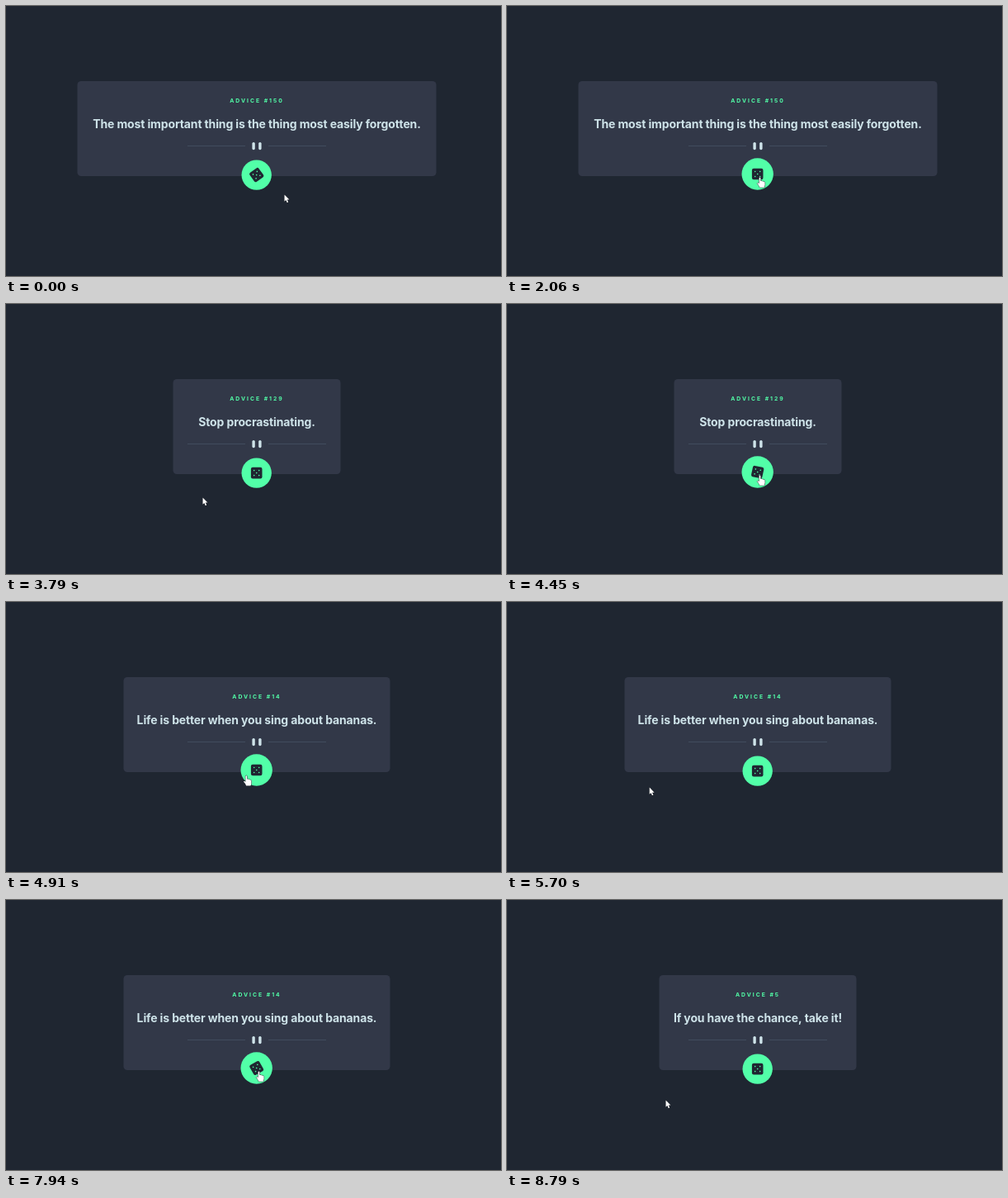
An HTML page with a canvas that plays this animation: 600 px wide and 327 px high, repeating every 9 s.

```html
<!DOCTYPE html>
<html lang="en">
<head>
<meta charset="utf-8">
<title>Advice generator</title>
<style>
  html, body { margin: 0; width: 100%; height: 100%; overflow: hidden; background: #1f2631; }
  canvas { display: block; width: 600px; height: 327px; }
</style>
</head>
<body>
<canvas id="stage"></canvas>
<script>
const LOOP = 9000, W = 600, H = 327, CX = 304;
const SPIN = 600, FETCH = 360, FADE = 150;
const BG = '#1f2631', CARD = '#323848', TEXT = '#cee3e9', GREEN = '#52ffa8', RULE = '#465365';
const FONT = 'Inter, "Open Sans", sans-serif';
const BUTTON = { x: 303.7, y: 204.6, r: 18.2 };

const canvas = document.getElementById('stage');
const ctx = canvas.getContext('2d');
const dpr = window.devicePixelRatio || 1;
canvas.width = W * dpr;
canvas.height = H * dpr;

const advice = [
  { click: -FETCH, id: 150, width: 435, quote: 'The most important thing is the thing most easily forgotten.' },
  { click: 2060, id: 129, width: 203, quote: 'Stop procrastinating.' },
  { click: 4240, id: 14, width: 323, quote: 'Life is better when you sing about bananas.' },
  { click: 7785, id: 5, width: 239, quote: 'If you have the chance, take it!' }
];

// the pointer rests at each place until the next move starts
const home = { x: 337.5, y: 228.5 };
const press = { x: 306.5, y: 207.5 };
const moves = [
  { from: 1390, to: 1910, ...press },
  { from: 2540, to: 3270, x: 215.5, y: 240.5 },
  { from: 3450, to: 3780, x: 238.5, y: 234.5 },
  { from: 3880, to: 4150, ...press },
  { from: 4760, to: 5390, x: 201.5, y: 226 },
  { from: 5640, to: 5910, x: -20, y: 215 },
  { from: 6700, to: 6880, x: 249, y: 174 },
  { from: 6940, to: 7350, ...press },
  { from: 8220, to: 8790, x: 192.5, y: 242.5 }
];

function ease(u) {
  u = Math.min(1, Math.max(0, u));
  return u * u * (3 - 2 * u);
}

function pointer(t) {
  return moves.reduce((p, m) => {
    const u = ease((t - m.from) / (m.to - m.from));
    return { x: p.x + (m.x - p.x) * u, y: p.y + (m.y - p.y) * u };
  }, home);
}

function isOver(t) {
  const p = pointer(t);
  return Math.hypot(p.x - BUTTON.x, p.y - BUTTON.y) < BUTTON.r + 1;
}

// eased share of the recent past spent over the button
function hoverLevel(t) {
  const steps = 15;
  let n = 0;
  for (let k = 0; k < steps; k++) n += isOver(t - k * FADE / steps);
  return ease(n / steps);
}

function spinAngle(t) {
  const { click } = advice.findLast(a => a.click <= t);
  return Math.PI * 2 * ease((t - click) / SPIN);
}

function box(x, y, w, h, r, color) {
  ctx.fillStyle = color;
  ctx.beginPath();
  ctx.roundRect(x, y, w, h, r);
  ctx.fill();
}

function dot(x, y, r, color) {
  ctx.fillStyle = color;
  ctx.beginPath();
  ctx.arc(x, y, r, 0, Math.PI * 2);
  ctx.fill();
}

function label(text, y, size, spacing, color) {
  ctx.font = `700 ${size}px ${FONT}`;
  ctx.letterSpacing = spacing + 'px';
  ctx.textAlign = 'center';
  ctx.fillStyle = color;
  ctx.fillText(text, CX, y);
}

function drawCard(t) {
  const { id, width, quote } = advice.findLast(a => a.click + FETCH <= t);
  box(CX - width / 2, 91, width, 115, 4.5, CARD);
  label('ADVICE #' + id, 116.7, 6.8, 2, GREEN);
  label(quote, 147.8, 14, -0.13, TEXT);
  for (const side of [-1, 1]) {
    box(CX + side * 49 - 35, 169.2, 70, 0.8, 0, RULE);
    box(CX + side * 3.9 - 1.7, 165, 3.4, 9.2, 1.6, TEXT);
  }
}

function drawButton(t) {
  const level = hoverLevel(t);
  ctx.save();
  ctx.translate(BUTTON.x, BUTTON.y - 1.1 * level);
  dot(0, 0, BUTTON.r * (1 + 0.055 * level), GREEN);
  ctx.rotate(spinAngle(t));
  box(-6.8, -6.8, 13.6, 13.6, 2.2, BG);
  dot(0, 0, 0.8, GREEN);
  for (const x of [-3, 3]) for (const y of [-3, 3]) dot(x, y, 0.8, GREEN);
  ctx.restore();
}

function outline(shape) {
  ctx.lineJoin = 'round';
  ctx.lineWidth = 1;
  ctx.strokeStyle = '#14181f';
  ctx.stroke(shape);
  ctx.fillStyle = '#fff';
  ctx.fill(shape);
}

const arrow = new Path2D('M0 0V9.2L2.1 7.3L3.6 10.8L5.2 10.1L3.7 6.8H6.6Z');
const hand = new Path2D('M-1 1C-1 -.3 1 -.3 1 1V5Q2.8 4 3 5.4Q4.8 4.8 5 6' +
  'Q6.8 5.7 6.8 7V10Q6.8 11.5 5.8 13.6H-.2Q-.8 11 -3.4 8.7C-4 7.6 -2.6 6.8 -1 8.4Z');

function drawPointer(t) {
  const { x, y } = pointer(t);
  ctx.save();
  ctx.translate(x, y);
  ctx.scale(0.9, 0.9);
  outline(isOver(t) ? hand : arrow);
  ctx.restore();
}

function draw(t) {
  ctx.setTransform(dpr, 0, 0, dpr, 0, 0);
  ctx.fillStyle = BG;
  ctx.fillRect(0, 0, W, H);
  drawCard(t);
  drawButton(t);
  drawPointer(t);
}

const began = performance.now();
function tick() {
  draw((performance.now() - began) % LOOP);
  requestAnimationFrame(tick);
}
tick();
</script>
</body>
</html>
```
